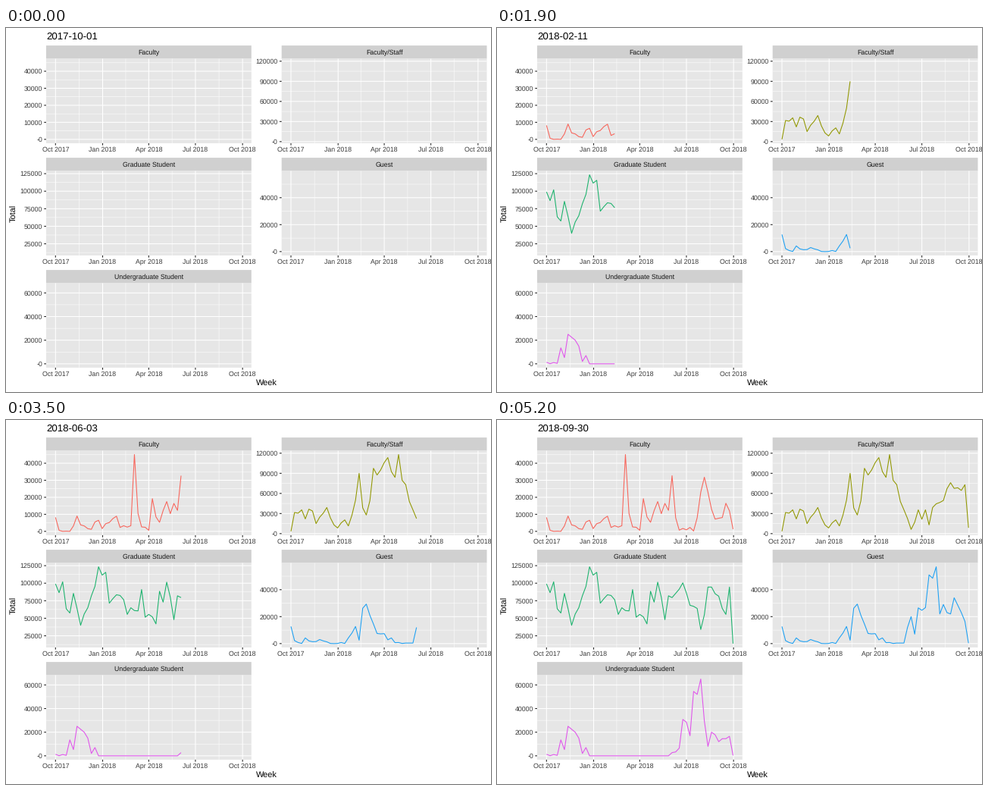
Animation of 640 by 480 pixels, one loop 5.3 s. Source, as a matplotlib script:

```python
import matplotlib.pyplot as plt
import numpy as np
from matplotlib.animation import FuncAnimation
from matplotlib.patches import Rectangle

W, H, DPI = 640, 480, 80
WEEKS = 53
START = np.datetime64("2017-10-01")
PANEL_W, PANEL_H, STRIP_H = 270.8, 111.4, 17.4

plt.rcParams["font.family"] = "Liberation Sans"
plt.rcParams["text.hinting"] = "none"

# Weekly totals in hundreds
faculty = [
    82, 6, 0, 1, 0, 32, 90, 38, 32, 16, 12, 55, 65, 16, 45, 52, 75, 89,
    23, 33, 25, 33, 451, 105, 26, 24, 6, 192, 85, 53, 122, 175, 104, 164,
    123, 327, 80, 7, 17, 9, 23, 2, 80, 230, 318, 230, 130, 72, 77, 81,
    165, 120, 13]
staff = [
    34, 315, 305, 355, 220, 365, 338, 150, 245, 305, 390, 235, 130, 85,
    160, 205, 115, 275, 500, 900, 385, 278, 490, 975, 875, 950, 1060, 1135,
    925, 840, 1180, 795, 730, 480, 355, 225, 63, 170, 355, 215, 355, 130,
    390, 445, 465, 495, 670, 760, 675, 685, 645, 730, 87]
graduate = [
    990, 865, 1020, 635, 575, 855, 640, 400, 560, 650, 820, 955, 1234, 1115,
    1155, 715, 780, 835, 825, 765, 555, 650, 610, 605, 910, 515, 555, 520,
    420, 885, 730, 1015, 800, 480, 820, 795, 855, 915, 1005, 860, 685, 670,
    640, 340, 550, 945, 945, 850, 815, 640, 555, 945, 139]
guest = [
    127, 22, 8, 1, 42, 20, 14, 15, 30, 20, 13, 1, 0, 1, 8, 1, 42, 78, 127,
    25, 262, 293, 210, 145, 75, 72, 74, 28, 42, 7, 8, 1, 4, 4, 4, 120, 200,
    70, 265, 247, 267, 510, 485, 570, 220, 290, 230, 220, 340, 285, 230,
    165, 3]
undergrad = [13, 1, 11, 4, 135, 53, 250, 225, 200, 150, 20, 70] + [0] * 23 + [
    27, 33, 65, 308, 285, 170, 545, 520, 650, 295, 80, 200, 178, 120, 145,
    145, 165, 3]

# title, values, panel left, strip top, tick step, colour
PANELS = [
    ("Faculty", faculty, 53, 23.1, 10000, "#f8645a"),
    ("Faculty/Staff", staff, 363.7, 23.1, 30000, "#919700"),
    ("Graduate Student", graduate, 53, 171.1, 25000, "#1ab26c"),
    ("Guest", guest, 363.7, 171.1, 20000, "#1ca0f3"),
    ("Undergraduate Student", undergrad, 53, 319.1, 20000, "#e053ec"),
]
MONTHS = [(0, "Oct 2017"), (92, "Jan 2018"), (182, "Apr 2018"),
          (273, "Jul 2018"), (365, "Oct 2018")]

fig = plt.figure(figsize=(W / DPI, H / DPI), dpi=DPI, facecolor="white")
stage = fig.add_axes([0, 0, 1, 1])
stage.set_xlim(0, W)
stage.set_ylim(H, 0)
stage.axis("off")


def pt(px):
    return px * 72 / DPI


def stroke(xs, ys, color, width, z):
    return stage.plot(xs, ys, color=color, lw=pt(width), zorder=z, snap=False,
                      solid_capstyle="butt", solid_joinstyle="round")[0]


def label(x, y, text, size=8.8, color="#3a3a3a", ha="center", **kw):
    return stage.text(x, y, text, fontsize=pt(size), color=color, ha=ha,
                      va="baseline", **kw)


def box(x, y, w, h, color):
    stage.add_patch(Rectangle((x, y), w, h, fc=color, ec="none", zorder=1,
                              snap=False))


def midpoints(values):
    values = np.asarray(values, float)
    return (values[1:] + values[:-1]) / 2


def draw_panel(title, hundreds, left, strip_top, step, color):
    """Draw the fixed parts; return the line and its full path."""
    values = np.array(hundreds) * 100.0
    top = strip_top + STRIP_H
    right, bottom = left + PANEL_W, top + PANEL_H
    low, high = values.min(), values.max()
    pad = 0.05 * (high - low)
    low, high = low - pad, high + pad
    day_span = 7 * (WEEKS - 1)

    def to_x(day):
        return left + (np.asarray(day) / day_span + 0.05) / 1.1 * PANEL_W

    def to_y(value):
        return bottom - (value - low) / (high - low) * PANEL_H

    box(left, strip_top, PANEL_W, STRIP_H, "#d0d0d0")
    box(left, top, PANEL_W, PANEL_H, "#e6e6e6")
    label((left + right) / 2, strip_top + 12, title, color="#141414")

    days = [day for day, _ in MONTHS]
    ticks = np.arange(np.ceil(low / step), np.floor(high / step) + 1) * step
    minor = np.arange(ticks[0] - step / 2, high, step)
    for day in midpoints(days):
        stroke([to_x(day)] * 2, [top, bottom], "white", 0.53, 2)
    for value in minor[minor > low]:
        stroke([left, right], [to_y(value)] * 2, "white", 0.53, 2)

    for day, name in MONTHS:
        x = to_x(day)
        stroke([x, x], [top, bottom], "white", 1.07, 3)
        stroke([x, x], [bottom, bottom + 2.75], "#252525", 1.07, 3)
        label(x, bottom + 11.2, name)
    for value in ticks:
        y = to_y(value)
        stroke([left, right], [y, y], "white", 1.07, 3)
        stroke([left - 2.75, left], [y, y], "#252525", 1.07, 3)
        label(left - 5, y + 3.2, f"{value:.0f}", ha="right")

    line = stroke([], [], color, 1.07, 4)
    return line, to_x(7 * np.arange(WEEKS)), to_y(values)


series = [draw_panel(*panel) for panel in PANELS]
heading = label(53, 15, "", size=13.2, color="black", ha="left")
label(343.7, 472, "Week", size=11, color="black")
label(13.4, 244.5, "Total", size=11, color="black", rotation=90,
      rotation_mode="anchor")


def update(week):
    heading.set_text(str(START + 7 * week))
    for line, xs, ys in series:
        line.set_data(xs[:week + 1], ys[:week + 1])
    return [heading] + [line for line, _, _ in series]


anim = FuncAnimation(fig, update, frames=WEEKS, interval=100, repeat=True,
                     repeat_delay=0, blit=False)
plt.show()
```
